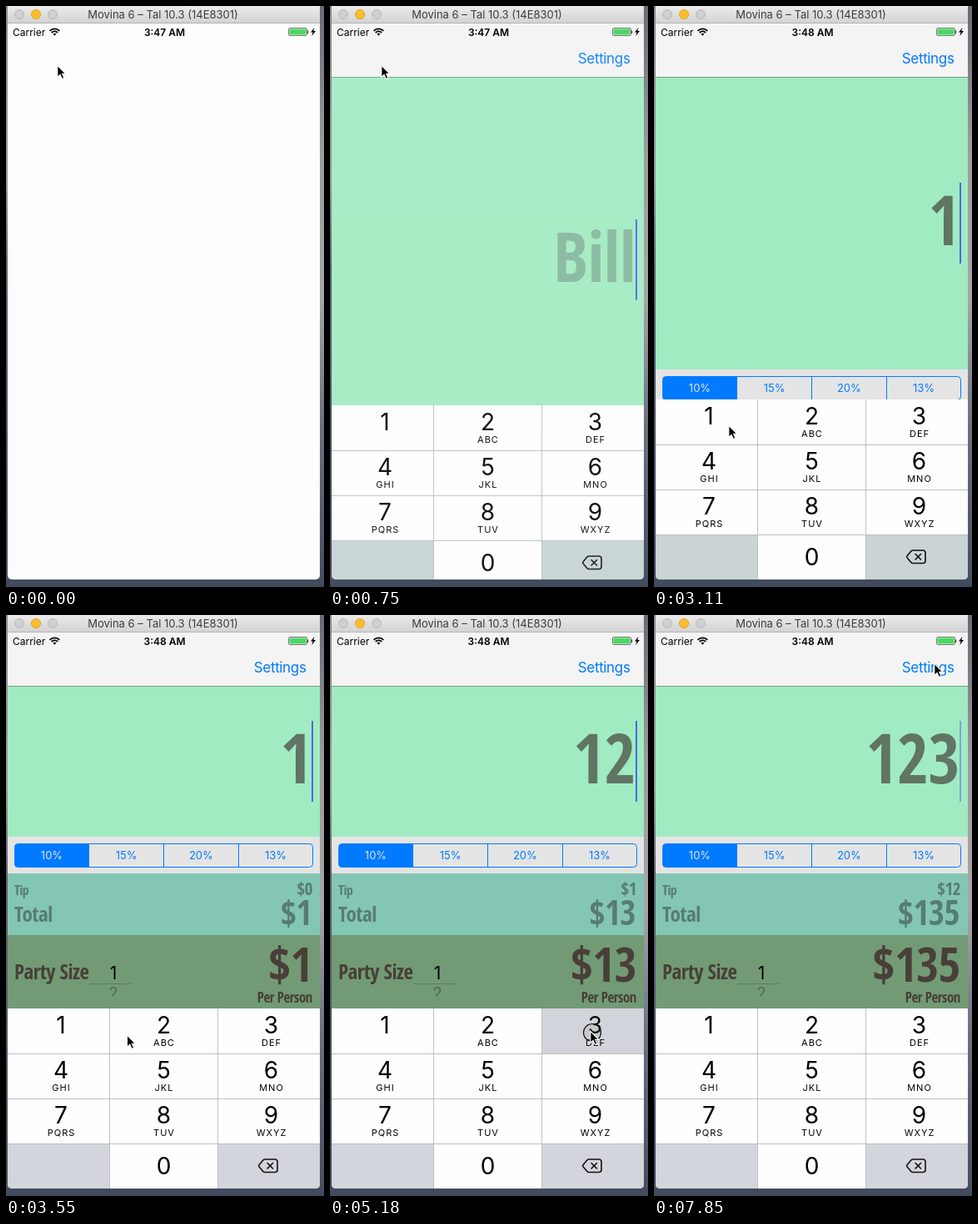
These frames come from a looping animation (382x697 px, 8 s). An HTML page:

```html
<!DOCTYPE html>
<html lang="en">
<head>
<meta charset="utf-8">
<title>Tip calculator</title>
<style>
  html, body { margin: 0; width: 100%; height: 100%; overflow: hidden; }
  svg { display: block; width: 382px; height: 697px; font-family: Inter, sans-serif; }
  .cond { font-family: "Open Sans Condensed", "Open Sans Condensed Light", "Open Sans", sans-serif;
          font-stretch: 75%; font-weight: 300; letter-spacing: -.03em; }
  .mid { text-anchor: middle; }
  .end { text-anchor: end; }
</style>
</head>
<body>
<svg viewBox="0 0 382 697">
  <defs>
    <linearGradient id="desk" x2="0" y2="1">
      <stop stop-color="#696b75"/><stop offset=".25" stop-color="#9c9c9f"/>
      <stop offset=".5" stop-color="#a6a6a8"/><stop offset=".72" stop-color="#6d7280"/>
      <stop offset="1" stop-color="#454d60"/>
    </linearGradient>
    <linearGradient id="deskLeft" x2="0" y2="1">
      <stop stop-color="#8d8d92"/><stop offset=".3" stop-color="#98989c"/>
      <stop offset=".45" stop-color="#5c6374"/><stop offset="1" stop-color="#454d60"/>
    </linearGradient>
    <linearGradient id="bar" x2="0" y2="1">
      <stop stop-color="#ebebeb"/><stop offset="1" stop-color="#d3d3d3"/>
    </linearGradient>
    <clipPath id="window"><path d="M2 0H377V683a5 5 0 0 1-5 5H7a5 5 0 0 1-5-5Z"/></clipPath>
    <clipPath id="wheel"><rect x="100" y="444" width="50" height="13"/></clipPath>
  </defs>

  <rect width="382" height="697" fill="url(#desk)"/>
  <rect width="3" height="697" fill="url(#deskLeft)"/>
  <rect y="688" width="382" height="9" fill="#434b5e"/>

  <g clip-path="url(#window)">
    <rect width="382" height="697" fill="#fdfdfd"/>

    <g id="app">
      <rect y="85" width="382" height="610" fill="#a1ebc2"/>
      <g id="amount" class="cond">
        <text id="bill" class="end" x="367" y="26" font-size="82"></text>
        <rect id="caret" x="367" y="-48.5" width="2" height="97" fill="#466be0"/>
      </g>

      <g id="panel">
        <rect width="382" height="44" fill="#e4e4e4"/>
        <g id="segments" class="mid" font-size="13">
          <path d="M100 8.5H14.5a4 4 0 0 0-4 4v20a4 4 0 0 0 4 4H100Z" fill="#007aff"/>
          <rect x="10.5" y="8.5" width="358" height="28" rx="4" fill="none" stroke="#007aff"/>
          <path d="M189.5 8.5v28M279.5 8.5v28" stroke="#007aff"/>
        </g>
        <rect y="44" width="382" height="74" fill="#83c6b3"/>
        <rect y="118" width="382" height="200" fill="#729b75"/>
        <g class="cond" fill="#577c71">
          <text x="10" y="70" font-size="16">Tip</text>
          <text x="10" y="102" font-size="25">Total</text>
          <text id="tip" class="end" x="368" y="70" font-size="21"></text>
          <text id="total" class="end" x="367" y="106" font-size="41"></text>
        </g>
        <g class="cond" fill="#493f38" style="font-weight:400">
          <text x="10" y="171" font-size="25">Party Size</text>
          <text id="share" class="end" x="368" y="174" font-size="58"></text>
          <text class="end" x="368" y="199" font-size="17">Per Person</text>
        </g>
        <g class="mid" transform="translate(0 -266)">
          <text x="129" y="437" font-size="21">1</text>
          <path d="M100 442.5h50" stroke="#5a7c5f"/>
          <text x="129" y="460" font-size="19" fill="#36493a" opacity=".6" clip-path="url(#wheel)">2</text>
        </g>
      </g>

      <rect y="20" width="382" height="65" fill="#f4f4f4"/>
      <path d="M0 85.5h382" stroke="#000" stroke-opacity=".32"/>
      <text class="end" x="360.5" y="69" font-size="17" letter-spacing="-.35" fill="#007aff">Settings</text>

      <g id="keypad" class="mid">
        <rect id="backdrop" y="472" width="382" height="216"/>
        <path d="M0 472H382V634H254.5V688H124.5V634H0Z" fill="#fefefe"/>
        <rect id="pressed" y="472" height="54" fill="#d1d4da"/>
        <path d="M124.5 472V688M254.5 472V688M0 526.5H382M0 580.5H382M0 634.5H382" stroke="#bcc0c3" fill="none"/>
        <g fill="none" stroke="#111" stroke-width="1.6" stroke-linecap="round" stroke-linejoin="round">
          <path d="M311 653H323a3 3 0 0 1 3 3v9.500a3 3 0 0 1-3 3H311a3 3 0 0 1-2-.8l-5-5.900a1.500 1.500 0 0 1 0-2l5-6a3 3 0 0 1 2-.8Z"/>
          <path d="M314 657.500l6.500 6.500m0-6.500l-6.500 6.500"/>
        </g>
      </g>
    </g>

    <rect width="382" height="20" fill="url(#bar)"/>
    <path d="M0 20.5h382" stroke="#b4b4b4"/>
    <g stroke="#b9b9b9" fill="#d0d0d0">
      <circle cx="16" cy="10" r="5.500"/><circle cx="56" cy="10" r="5.500"/>
      <circle cx="36" cy="10" r="5.500" fill="#fdbd2f" stroke="#dfa12b"/>
    </g>
    <text class="mid" x="188.500" y="15" font-size="13" fill="#3c3c3c">Movina 6 – Tal 10.3 (14E8301)</text>

    <text x="8" y="35.500" font-size="12">Carrier</text>
    <g fill="none" stroke="#000" stroke-width="1.800">
      <path d="M52.500 29.800a8.300 8.300 0 0 1 11.800 0M54.700 32a5.200 5.200 0 0 1 7.400 0"/>
      <path d="M58.400 35.800l-2-2.200a3 3 0 0 1 4 0Z" fill="#000" stroke="none"/>
    </g>
    <text id="clock" class="mid" x="190.500" y="35.500" font-size="12" font-weight="600"></text>
    <rect x="339.500" y="26.500" width="22" height="9" rx="1.500" fill="#fff" stroke="#777"/>
    <rect x="340.500" y="27.500" width="20" height="7" fill="#4bd763"/>
    <path d="M362.500 29.500v3.500" stroke="#555" stroke-width="1.500"/>
    <path d="M370.500 26l-4.500 5.500h2.500l-1.200 4.500 4.700-6h-2.600Z"/>
  </g>

  <g id="cursor">
    <circle id="touch" cx="3" cy="3" r="10.500" fill="#888" fill-opacity=".15" stroke="#111" stroke-width="1.200"/>
    <path d="M.8 1.300V15.400L4 12.400l2.400 5.200 2.500-1.100-2.300-5.100h4.300Z" stroke="#fff" stroke-width="1.100"/>
  </g>
</svg>

<script>
const $ = id => document.getElementById(id);
const STEP = 148, LOOP = 8000;
const SHIFT_CLOSED = 537, SHIFT_OPEN = 266;

function addText(parent, x, y, size, text, attrs = {}) {
  const node = document.createElementNS('http://www.w3.org/2000/svg', 'text');
  Object.entries({ x, y, 'font-size': size, ...attrs }).forEach(([k, v]) => node.setAttribute(k, v));
  node.textContent = text;
  parent.append(node);
}

['10%', '15%', '20%', '13%'].forEach((label, i) =>
  addText($('segments'), 55 + i * 89.7, 27, 13, label, { fill: i ? '#007aff' : '#e4e4e4' }));

const columns = [66, 189.5, 318.5];
['', 'ABC', 'DEF', 'GHI', 'JKL', 'MNO', 'PQRS', 'TUV', 'WXYZ'].forEach((letters, i) => {
  const x = columns[i % 3], y = 502 + 54 * Math.floor(i / 3);
  addText($('keypad'), x, y, 28, i + 1);
  addText($('keypad'), x + .5, y + 15, 11, letters, { 'letter-spacing': 1 });
});
addText($('keypad'), 189.5, 671, 28, 0);

// time, x, y of the pointer
const pointerPath = [
  [1332, 61, 70], [2220, 71, 502], [2368, 73, 511], [2812, 74, 511], [3108, 89, 502],
  [3700, 155, 503], [3848, 161, 502], [4292, 161, 502], [4884, 307, 500], [5180, 312, 498],
  [6068, 312, 498], [6364, 309, 501], [6512, 309, 501], [7104, 331, 119], [7252, 331, 119],
  [7844, 336, 57]
];
// press start, press end, key x, key width
const presses = [[2660, 2800, 0, 124], [3840, 3990, 125, 129], [5030, 5320, 255, 127]];
const caretOff = [[1180, 1470], [2210, 2510], [4730, 5020], [5915, 6210], [6950, 7390]];

const clamp = v => Math.min(1, Math.max(0, v));
const smooth = v => (v = clamp(v), v * v * (3 - 2 * v));
const mix = (a, b, p) => a + (b - a) * p;

function pointerAt(t) {
  const next = pointerPath.findIndex(p => p[0] > t);
  if (next === 0) return pointerPath[0].slice(1);
  if (next < 0) return pointerPath.at(-1).slice(1);
  const [t0, x0, y0] = pointerPath[next - 1], [t1, x1, y1] = pointerPath[next];
  const p = smooth((t - t0) / (t1 - t0));
  return [mix(x0, x1, p), mix(y0, y1, p)];
}

function draw(t) {
  const within = ([from, to]) => t >= from && t < to;
  const move = (id, x, y) => $(id).setAttribute('transform', `translate(${x} ${y})`);

  $('app').setAttribute('opacity', t < 590 ? 0 : clamp((t - 400) / 370));
  const rise = Math.round(7 * 5 ** ((740 - Math.max(t, 590)) / STEP));
  move('keypad', 0, rise);

  const open = smooth((t - 2870) / 575);
  const panelY = Math.round(mix(SHIFT_CLOSED, SHIFT_OPEN, open) - rise * 1.8);
  move('panel', 0, open ? panelY : 700);
  move('amount', 0, (85 + panelY) / 2);
  $('backdrop').setAttribute('fill',
    `rgb(${mix(197, 210, open)},${mix(211, 213, open)},${mix(210, 219, open)})`);

  const entered = t < 2800 ? 0 : t < 3990 ? 1 : t < 5320 ? 12 : 123;
  $('bill').textContent = entered || 'Bill';
  $('bill').setAttribute('fill', entered ? '#607564' : '#83b79d');
  const total = '$' + Math.floor(entered * 1.1);
  $('tip').textContent = '$' + Math.floor(entered * .1);
  $('total').textContent = $('share').textContent = total;
  $('caret').setAttribute('opacity', caretOff.some(within) ? 0 : t > 7800 ? .5 : 1);
  $('clock').textContent = t < 2800 ? '3:47 AM' : '3:48 AM';

  const press = presses.find(within);
  $('pressed').setAttribute('x', press ? press[2] : 0);
  $('pressed').setAttribute('width', press ? press[3] : 0);
  $('touch').setAttribute('opacity', press ? 1 : 0);
  move('cursor', ...pointerAt(t));
}

function tick() {
  const t = performance.now() % LOOP;
  draw(Math.floor((t + 6) / STEP) * STEP);
  requestAnimationFrame(tick);
}
tick();
</script>
</body>
</html>
```
